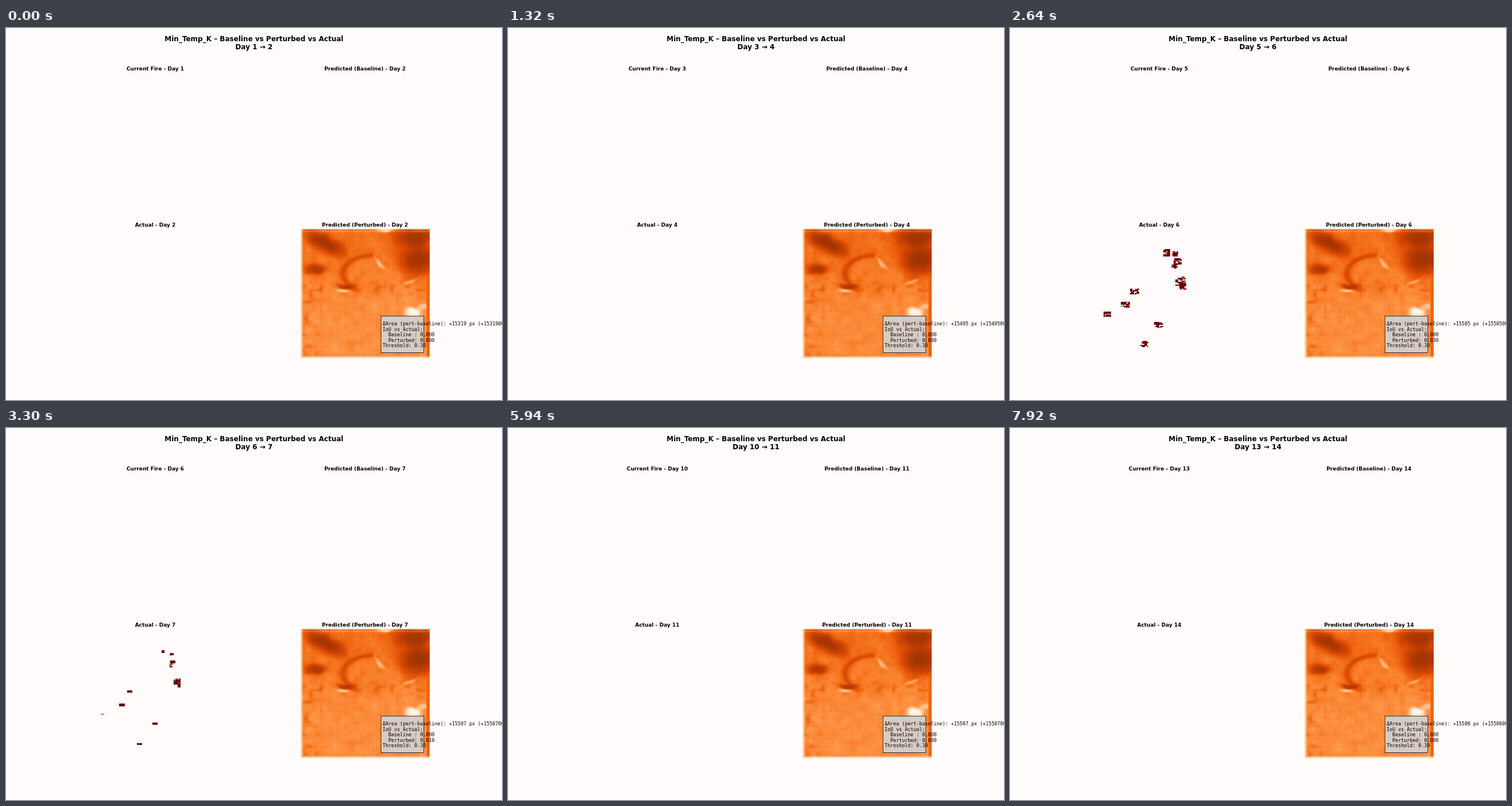
An HTML page with a canvas that plays this animation: 864x648 px, repeating every 8000 ms.

```html
<!DOCTYPE html>
<html lang="en">
<head>
<meta charset="utf-8">
<title>Baseline vs Perturbed vs Actual</title>
<style>
  html, body { margin: 0; width: 100%; height: 100%; overflow: hidden; background: #fffcfb; }
  canvas, svg { position: absolute; left: 0; top: 0; }
  text { font: bold 9px "DejaVu Sans", sans-serif; text-anchor: middle; }
  .head { font-size: 12px; }
  .stats text { font: 8.37px "DejaVu Sans Mono", monospace; text-anchor: start; white-space: pre; }
</style>
</head>
<body>
<canvas id="view" width="864" height="648"></canvas>
<svg width="864" height="648">
  <text class="head" x="432" y="22.7">Min_Temp_K – Baseline vs Perturbed vs Actual</text>
  <text class="head" x="432" y="37.3" id="days"></text>
  <text x="260" y="73.6" id="current"></text>
  <text x="625.3" y="73.6" id="baseline"></text>
  <text x="260" y="345.5" id="actual"></text>
  <text x="625.3" y="345.5" id="perturbed"></text>
  <g class="stats">
    <rect x="653.2" y="502" width="74.6" height="63.4" fill="#d3d3d3" fill-opacity=".9" stroke="#000" stroke-width=".75"/>
    <text x="656" y="518.4" id="area"></text>
    <text x="656" y="527.8">IoU vs Actual:</text>
    <text x="656" y="537.2">  Baseline : 0.000</text>
    <text x="656" y="546.6" id="iou"></text>
    <text x="656" y="556">Threshold: 0.30</text>
  </g>
</svg>
<script>
const N = 128, SIZE = 224.6, CELL = SIZE / N, TOP = 350.3, LEFT = 147.7, RIGHT = 512.9;
const STEP = 660, LOOP = 8000;
const $ = id => document.getElementById(id);
const view = $('view').getContext('2d');

const areas = [15319, 15473, 15495, 15503, 15505, 15507, 15507, 15507, 15507, 15507, 15508, 15507, 15506];
const ious = [0, 0, 0, .074, .03, .01, .004, .001, .002];

// Heat patches: x, y, rx, ry, angle, value
const patches = [
  [556, 374, 42, 16, .5, .87], [541, 421, 20, 10, 0, .84], [712, 365, 40, 17, 0, .87],
  [718, 403, 36, 29, 0, .88], [592, 450, 18, 5, .1, .84],
  [652, 411, 13, 3.5, .73, .3], [585, 457, 11, 2.5, .1, .2], [703, 443, 14, 3, -.5, .36],
  [662, 352, 17, 4, 0, .25], [710, 496, 13, 8, 0, -.05], [727, 486, 11, 5, -.2, .27]
];

// Fire spots, the longest burning first: x, y, width, height
const spots = [
  [291, 407, 8, 5], [216, 459, 9, 4], [202, 482, 10, 5], [297, 441, 12, 10], [287, 413, 5, 7],
  [259, 516, 9, 4], [233, 550, 8, 4], [273, 391, 6, 6], [169, 499, 6, 2], [288, 394, 7, 3], [301, 450, 6, 6]
];

const mix = (a, b, t) => a + (b - a) * t;
const clamp = (v, a = 0, b = 1) => Math.min(b, Math.max(a, v));
const hash = (i, j) => {
  const s = Math.sin(i * 127.1 + j * 311.7) * 43758.5453;
  return s - Math.floor(s);
};
function noise(x, y) {
  const i = Math.floor(x), j = Math.floor(y), u = x - i, v = y - j;
  return mix(mix(hash(i, j), hash(i + 1, j), u), mix(hash(i, j + 1), hash(i + 1, j + 1), u), v) - .5;
}

const ramp = ['fff5eb', 'fee6ce', 'fdd0a2', 'fdae6b', 'fd8d3c', 'f16913', 'd94801', 'a63603', '7f2704']
  .map(c => [0, 2, 4].map(k => parseInt(c.slice(k, k + 2), 16)));
function orange(v) {
  const p = clamp(v, 0, .9999) * 8, i = Math.floor(p);
  return ramp[i].map((c, k) => mix(c, ramp[i + 1][k], p - i));
}

function cover(v, [cx, cy, rx, ry, a, value], x, y) {
  const dx = x - cx, dy = y - cy;
  const p = (dx * Math.cos(a) + dy * Math.sin(a)) / rx;
  const q = (dy * Math.cos(a) - dx * Math.sin(a)) / ry;
  return mix(v, value, Math.exp(-((p * p + q * q) ** 1.5)));
}

function heatAt(i, j) {
  const x = RIGHT + (i + .5) * CELL, y = TOP + (j + .5) * CELL;
  let v = mix(.59, .49, clamp((y - 390) / 100));
  v += noise(i / 7, j / 7 + 90) * .08 + noise(i / 3 + 30, j / 3) * .05;
  // dark specks along the middle and down the left side
  const speck = Math.max(Math.exp(-(((y - 456) / 14) ** 2)), y > 456 ? clamp((570 - x) / 40) : 0);
  v += speck * .3 * Math.max(0, noise(i / 5 + 7, j / 4 + 40));
  // winding line: part of an ellipse
  const ring = (Math.hypot((x - 638) / 51, (y - 428) / 32) - 1) / .13;
  if (x < 640 && y < 450) v = mix(v, .74, Math.exp(-ring * ring));
  const wx = x + noise(i / 6, j / 6) * 6, wy = y + noise(i / 6 + 50, j / 6) * 6;
  for (const p of patches) v = cover(v, p, wx, wy);
  v += (i % 2 ? .025 : -.025) + (j % 2 ? .015 : -.015);
  if (i > 124) v = Math.max(v, .64);
  if (j === 0 || j === 2) v -= .12;
  return mix(.1, v, clamp(Math.min(i + .3, N - .5 - j) / 2.5));
}

function grid() {
  const c = document.createElement('canvas');
  c.width = c.height = N;
  return c.getContext('2d');
}
const heat = grid(), fire = grid();
const field = Array.from({ length: N * N }, (_, k) => heatAt(k % N, Math.floor(k / N)));

function drawHeat(step) {
  const img = heat.createImageData(N, N);
  const gain = step ? .005 + .025 * Math.exp((1 - step) / 1.5) : 0;
  field.forEach((v, k) => img.data.set([...orange(v + gain), 255], k * 4));
  heat.putImageData(img, 0, 0);
  view.imageSmoothingEnabled = true;
  view.drawImage(heat.canvas, RIGHT, TOP, SIZE, SIZE);
}

// Ragged patch of burning cells; each row slides sideways by shift
const reds = ['#67000d', '#8a0812', '#cb181d', '#f6583e', '#fcab8f'];
function burn(x, y, w, h, shift = 0, density = 1) {
  const cols = Math.max(1, Math.round(w / CELL)), rows = Math.max(1, Math.round(h / CELL));
  const i0 = Math.round((x - w / 2 - LEFT) / CELL), j0 = Math.round((y - h / 2 - TOP) / CELL);
  for (let j = 0; j < rows; j++) for (let i = 0; i < cols; i++) {
    const u = (2 * i + 1) / cols - 1, v = (2 * j + 1) / rows - 1;
    const left = density - .3 * (u ** 4 + v ** 4) - noise((i + x) / 2, j + y) - .5;
    if (left < 0) continue;
    const tint = left > .12 ? 0 : Math.floor(hash(i + x, j + y) * reds.length);
    fire.fillStyle = reds[tint];
    fire.fillRect(i0 + i + Math.round(shift * (j - (rows - 1) / 2)), j0 + j, 1, 1);
  }
}

function burnWide() {
  burn(271, 414, 25, 40);
  burn(273, 443, 22, 46, 0, .95);
  burn(244, 407, 22, 16, 0, .6);
  burn(244, 435, 22, 26, 0, .66);
  burn(289, 430, 9, 60, .08, .42);
  burn(287, 500, 7, 36, 0, .5);
  burn(290, 532, 6, 36, 0, .48);
  burn(177, 495, 8, 8, -.5, 1.1);
  for (const [x, y] of [[254, 472], [259, 483], [258, 531], [253, 544]]) burn(x, y, 9, 14, -1.4, 1.05);
}

function drawFire(step) {
  fire.clearRect(0, 0, N, N);
  if (step === 3) burnWide();
  if (step > 3 && step < 9) {
    const grow = step === 4 ? 6 : 0;
    const count = Math.max(2, Math.round(spots.length / 2 ** Math.max(0, step - 5)));
    for (const [x, y, w, h] of spots.slice(0, count)) burn(x, y, w + grow, h + grow, 0, grow ? .8 : 1.05);
  }
  view.imageSmoothingEnabled = false;
  view.drawImage(fire.canvas, LEFT, TOP, SIZE, SIZE);
}

function show(step) {
  const day = step + 1, next = day + 1, area = areas[step];
  const labels = {
    days: `Day ${day} → ${next}`,
    current: `Current Fire - Day ${day}`,
    baseline: `Predicted (Baseline) - Day ${next}`,
    actual: `Actual - Day ${next}`,
    perturbed: `Predicted (Perturbed) - Day ${next}`,
    area: `ΔArea (pert-baseline): +${area} px (+${area}00.0%)`,
    iou: `  Perturbed: ${(ious[step] || 0).toFixed(3)}`
  };
  for (const id in labels) $(id).textContent = labels[id];
  view.clearRect(0, 0, 864, 648);
  drawFire(step);
  drawHeat(step);
}

let shown = -1;
function tick() {
  const step = Math.floor(performance.now() % LOOP / STEP);
  if (step !== shown) show(shown = step);
  requestAnimationFrame(tick);
}
tick();
</script>
</body>
</html>
```
